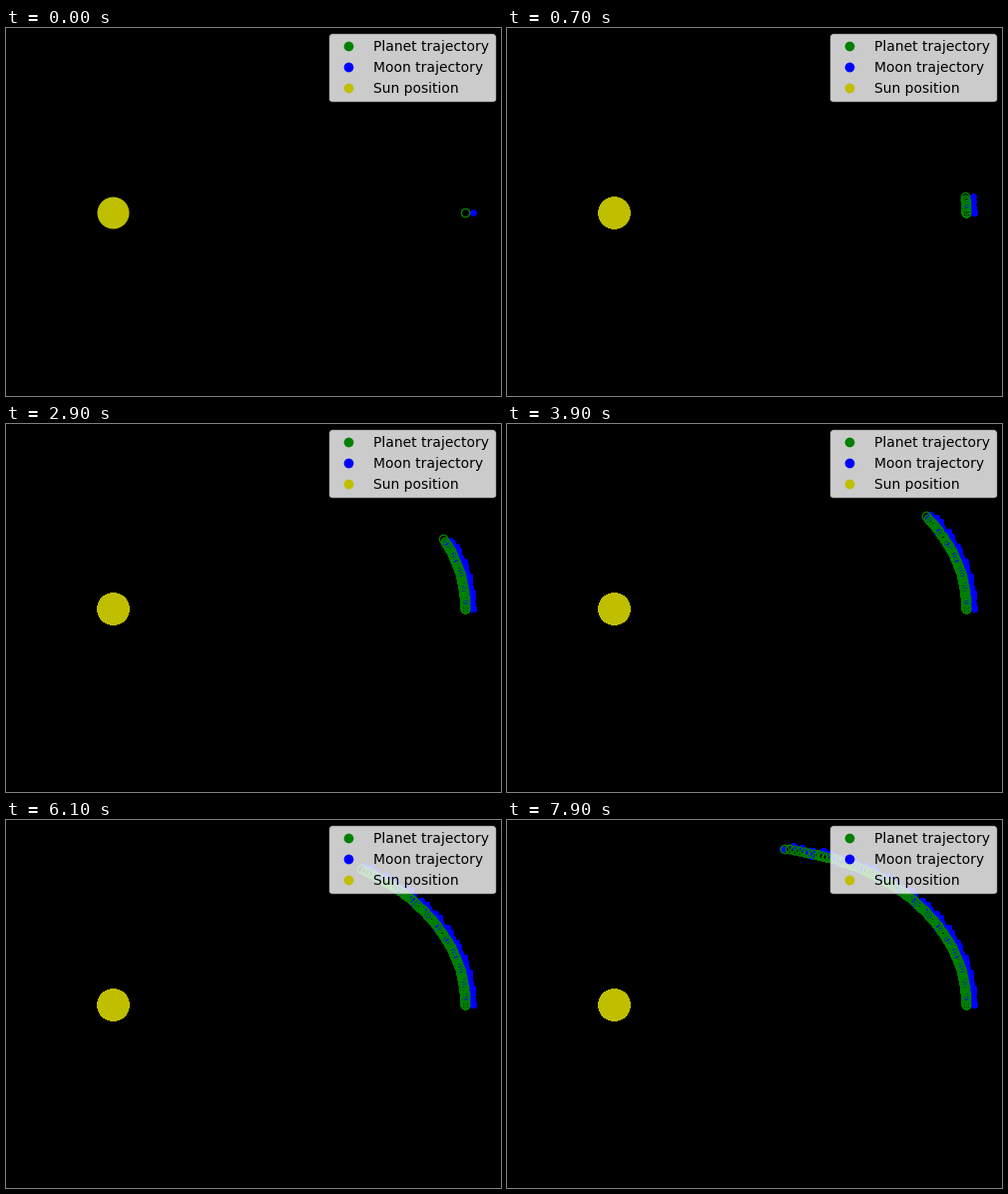
A matplotlib script for the animation above (8000 ms loop, 496x369 px).

```python
import numpy as np
import matplotlib.pyplot as plt
from matplotlib.animation import FuncAnimation
from matplotlib.lines import Line2D

W, H, DPI = 496, 369, 100
FRAMES, INTERVAL = 80, 100
ECC = 2 / 3
RATIO = 157 / 212           # vertical to horizontal semi-axis
SUN = np.array([106.5, 184.5])


def orbit(mean, a):
    """Offset from the focus on a Kepler ellipse, starting at aphelion."""
    E = mean / (1 + ECC)
    for _ in range(40):
        E = E - (E + ECC * np.sin(E) - mean) / (1 + ECC * np.cos(E))
    return np.column_stack([a * (np.cos(E) + ECC), -a * RATIO * np.sin(E)])


step = np.maximum(np.arange(FRAMES) - 1, 0)
planet = SUN + orbit(np.radians(1.535) * step, 212.2)
moon = planet + orbit(np.radians(62.3) * step, 4.7)

fig = plt.figure(figsize=(W / DPI, H / DPI), dpi=DPI, facecolor="black")
ax = fig.add_axes([0, 0, 1, 1])
ax.set_xlim(0, W)
ax.set_ylim(H, 0)
ax.axis("off")


def dots(points, color, size, **kw):
    return ax.plot(*points.T, "o", color=color, ms=size, visible=False, **kw)[0]


# Every step paints the whole trail once more over the previous ones.
layers = []
for k in range(FRAMES):
    layers.append([
        dots(SUN[None], "y", 22),
        dots(moon[:k + 1], "b", 4),
        dots(planet[:k + 1], "g", 6, mfc="none"),
    ])

labels = {"g": "Planet trajectory", "b": "Moon trajectory", "y": "Sun position"}
handles = [Line2D([], [], ls="none", marker="o", ms=6, color=c, label=text)
           for c, text in labels.items()]
ax.legend(handles=handles, loc="upper right", fontsize=10,
          bbox_to_anchor=(W + 0.8, -0.6), bbox_transform=ax.transData)


def update(i):
    for k, layer in enumerate(layers):
        for line in layer:
            line.set_visible(k <= i)
    return []


anim = FuncAnimation(fig, update, frames=FRAMES, interval=INTERVAL,
                     init_func=lambda: update(0), repeat=True, repeat_delay=0)
plt.show()
```
